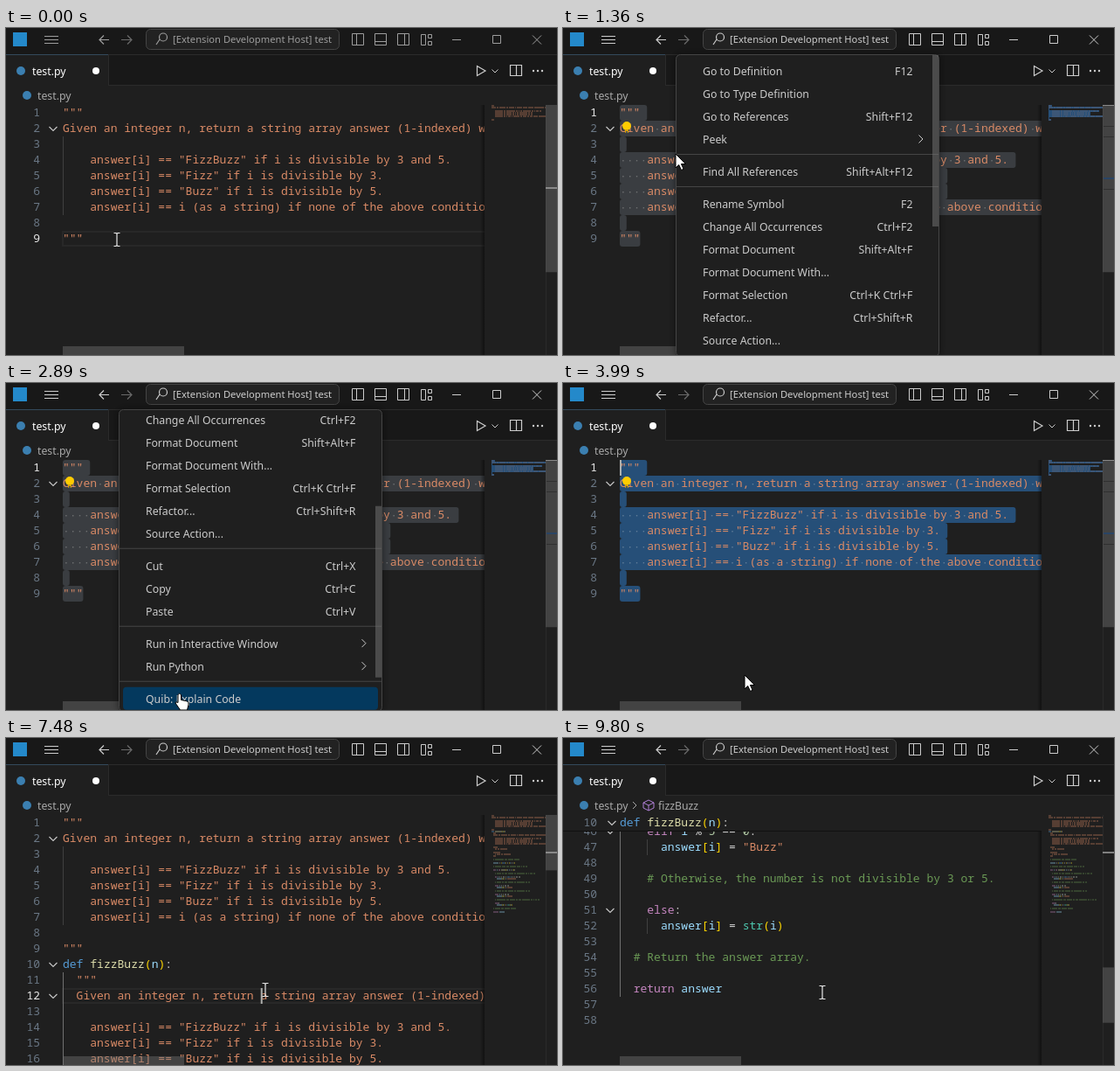
An HTML page with a canvas for the animation above (10000 ms loop, 631x374 px).

```html
<!DOCTYPE html>
<html lang="en">
<head>
<meta charset="utf-8">
<title>Editor</title>
<style>
html, body { margin: 0; width: 100%; height: 100%; overflow: hidden; background: #1f1f1f; }
canvas { display: block; }
</style>
</head>
<body>
<canvas id="stage" width="631" height="374"></canvas>
<script>
const ctx = document.getElementById('stage').getContext('2d');
const MONO = '13.03px "Noto Sans Mono", monospace';
const UI = '"Noto Sans", sans-serif';
const LOOP = 10000, LEFT = 65, TOP = 88, ROW = 18, CHAR = 7.818, VIEW = 286;
const FG = '#cccccc', BG = '#1f1f1f', BAR = '#181818', EDGE = '#2b2b2b', STRING = '#d98a66', NUM = '#6a7785';

// Moments in the story, in ms
const FOCUS = 100, DRAG = 300, RELEASE = 700, BLUR = 1110, MENU = 1140, BULB = 1240, PICK = 3830,
  NOTE = 4100, INSERT = 5560, COLOR = 6000, NOTE_END = 6600, CLICK = 7180, SYMBOL = 8110;

const cases = `    answer[i] == "FizzBuzz" if i is divisible by 3 and 5.
    answer[i] == "Fizz" if i is divisible by 3.
    answer[i] == "Buzz" if i is divisible by 5.
    answer[i] == i (as a string) if none of the above conditions are true.`;
const intro = 'Given an integer n, return a string array answer (1-indexed) where:';
const code = `"""
${intro}

${cases}

"""
def fizzBuzz(n):
  """
  ${intro}

${cases}

  Args:
    n: An integer.

  Returns:
    A list of strings.
  """

  # Initialize the answer array.

  answer = [None] * (n + 1)

  # Iterate over the numbers from 1 to n.

  for i in range(1, n + 1):

    # Check if the number is divisible by 3 and 5.

    if i % 3 == 0 and i % 5 == 0:
      answer[i] = "FizzBuzz"

    # Check if the number is divisible by 3.

    elif i % 3 == 0:
      answer[i] = "Fizz"

    # Check if the number is divisible by 5.

    elif i % 5 == 0:
      answer[i] = "Buzz"

    # Otherwise, the number is not divisible by 3 or 5.

    else:
      answer[i] = str(i)

  # Return the answer array.

  return answer

`.split('\n');

const rules = [
  [/^#/, '#6a9955'], [/^"/, STRING], [/^(def|None|and)$/, '#569cd6'],
  [/^(for|in|if|elif|else|return)$/, '#c586c0'], [/^str$/, '#4ec9b0'],
  [/^(fizzBuzz|range)$/, '#dcdcaa'], [/^\d/, '#b5cea8'], [/^\w/, '#9cdcfe'], [/^[()[\]]/, '#ffd700']
];
const isDoc = i => i < 9 || (i > 9 && i < 24);
const split = s => [...s.matchAll(/#.*|"[^"]*"|\w+|[()[\]]|[^\s\w"#()[\]]+/g)];
const colored = code.map((s, i) => isDoc(i)
  ? [[s, 0, STRING]]
  : split(s).map(m => [m[0], m.index, (rules.find(r => r[0].test(m[0])) || [0, '#d4d4d4'])[1]]));
const plain = code.map(s => [...s.matchAll(/[()[\]]|[^()[\]]+/g)]
  .map(m => [m[0], m.index, /[()[\]]/.test(m[0]) ? '#ffd700' : FG]));

const indent = s => s.search(/\S/);
const near = (i, d) => {
  while (code[i] === '') i += d;
  return code[i] === undefined ? 0 : indent(code[i]);
};
const folds = code.map((s, i) => s !== '' && near(i + 1, 1) > indent(s));
const levels = code.map((s, i) => {
  if (s) return Math.ceil(indent(s) / 4);
  const above = near(i, -1), below = near(i, 1);
  return above < below ? 1 + Math.floor(above / 4) : Math.ceil(below / 4);
});

const items = [
  ['Go to Definition', 'F12'], ['Go to Type Definition'], ['Go to References', 'Shift+F12'], ['Peek', '>'], 0,
  ['Find All References', 'Shift+Alt+F12'], 0,
  ['Rename Symbol', 'F2'], ['Change All Occurrences', 'Ctrl+F2'], ['Format Document', 'Shift+Alt+F'],
  ['Format Document With...'], ['Format Selection', 'Ctrl+K Ctrl+F'], ['Refactor...', 'Ctrl+Shift+R'],
  ['Source Action...'], 0,
  ['Cut', 'Ctrl+X'], ['Copy', 'Ctrl+C'], ['Paste', 'Ctrl+V'], 0,
  ['Run in Interactive Window', '>'], ['Run Python', '>'], 0,
  ['Quib: Explain Code'], ['Quib: Write Code'], 0,
  ['Command Palette...', 'Ctrl+Shift+P']
];

// Pointer stops: time, x, y
const stops = [
  [100, 127, 242], [250, 92, 242], [DRAG, 90, 242], [RELEASE, 66, 95], [750, 66, 95], [1080, 129, 144],
  [1520, 129, 144], [2070, 199, 355], [2890, 199, 355], [3020, 207, 325], [3520, 207, 325],
  [3630, 208, 334], [4050, 208, 334], [4600, 213, 280], [4860, 213, 280], [4950, 271, 272],
  [5210, 271, 272], [5360, 377, 266], [5560, 377, 266], [5750, 386, 256],
  [6500, 386, 256], [7100, 297, 288], [9580, 297, 288], [9800, 297, 291]
];

const clamp = (v, a, b) => Math.min(b, Math.max(a, v));

function pointer(t) {
  const k = stops.findIndex(s => s[0] > t);
  if (k < 1) return stops[k < 0 ? stops.length - 1 : 0].slice(1);
  const [a, b] = [stops[k - 1], stops[k]];
  let p = (t - a[0]) / (b[0] - a[0]);
  p = p * p * (3 - 2 * p);
  return [1, 2].map(j => a[j] + (b[j] - a[j]) * p);
}

// Wheel notches spread evenly from t0 to t1
const wheel = (t, t0, t1, n, size) => size * clamp(Math.floor((t - t0) / (t1 - t0) * (n - 1) + 1.001), 0, n);

const NOTCH = 800 / 19;
const scrollAt = t => wheel(t, 7680, 7880, 5, NOTCH) + wheel(t, 8520, 8640, 4, NOTCH)
  + wheel(t, 9040, 9140, 3, NOTCH) + wheel(t, 9580, 9800, 7, NOTCH);
const menuScroll = t => wheel(t, 2300, 2580, 7, 22) + wheel(t, 2890, 3020, 3, 94 / 3);

function rect(x, y, w, h, color, r = 0) {
  ctx.fillStyle = color;
  ctx.beginPath();
  ctx.roundRect(x, y, w, h, r);
  ctx.fill();
}
function text(s, x, y, color, font = MONO, align = 'left') {
  ctx.font = font;
  ctx.fillStyle = color;
  ctx.textAlign = align;
  ctx.fillText(s, x, y);
}
const label = (s, x, y, size = 12.3, color = FG, align) => text(s, x, y, color, `${size}px ${UI}`, align);
function stroke(d, color = FG, width = 1) {
  ctx.strokeStyle = color;
  ctx.lineWidth = width;
  ctx.stroke(new Path2D(d));
}
function dot(x, y, r, color) {
  rect(x - r, y - r, 2 * r, 2 * r, color, r);
}
function clipped(x, y, w, h, draw) {
  ctx.save();
  ctx.beginPath();
  ctx.rect(x, y, w, h);
  ctx.clip();
  draw();
  ctx.restore();
}
function panel(x, y, w, h, border) {
  ctx.save();
  ctx.shadowColor = 'rgba(0,0,0,.5)';
  ctx.shadowBlur = 8;
  rect(x, y, w, h, BG, 5);
  ctx.restore();
  ctx.strokeStyle = border;
  ctx.lineWidth = 1;
  ctx.beginPath();
  ctx.roundRect(x + .5, y + .5, w - 1, h - 1, 5);
  ctx.stroke();
}

function caretAt(t, [x, y]) {
  if (t < DRAG) return [8, 3];
  if (t >= CLICK) return [11, 29];
  if (t >= RELEASE) return [0, 0];
  const line = clamp(Math.floor((y - TOP) / ROW), 0, 8);
  return [line, clamp(Math.round((x - LEFT) / CHAR), 0, code[line].length)];
}
function caretOn(t) {
  if (t < FOCUS || (t >= BLUR && t < PICK)) return false;
  if (t < BLUR) return true;
  return Math.floor((t - (t < CLICK ? 3860 : CLICK)) / 500) % 2 === 0;
}

function drawLine(i, y, tokens) {
  for (const [s, col, color] of tokens[i]) text(s, LEFT + col * CHAR, y + 13, color);
}
const chevron = (x, y) => stroke(`M${x - 4.5} ${y - 2}l4.5 4.5 4.5-4.5`, '#c5c5c5', 1.2);

function drawEditor(t, mouse) {
  const count = t < INSERT ? 9 : 58, scroll = scrollAt(t), total = count * ROW + VIEW - ROW;
  const tokens = t < COLOR ? plain.map((p, i) => i < 9 ? colored[i] : p) : colored;
  const caret = caretAt(t, mouse), selecting = t >= DRAG && t < CLICK;
  const end = t < INSERT ? [8, 3] : [57, 0];
  const inactive = t >= BLUR && t < PICK;
  const selWidth = (i, from) => (i === end[0] ? end[1] : code[i].length + 1) - from;
  const selFrom = i => i === caret[0] ? caret[1] : 0;
  const selected = i => selecting && i >= caret[0] && i <= end[0];
  const yOf = i => TOP + i * ROW - scroll;

  clipped(0, TOP, 548, VIEW, () => {
    if (!selecting) {
      ctx.strokeStyle = '#282828';
      ctx.lineWidth = 2;
      ctx.strokeRect(LEFT, yOf(caret[0]) + 1, 490, ROW - 2);
    }
    for (let i = 0; i < count; i++) {
      const y = yOf(i);
      if (y < TOP - ROW || y > 374) continue;
      if (selected(i)) {
        const from = selFrom(i), x = LEFT + from * CHAR;
        rect(x, y, Math.max(0, selWidth(i, from) * CHAR), ROW, inactive ? '#3a3d41' : '#264f78', 3);
        for (let c = from; c < code[i].length; c++)
          if (code[i][c] === ' ') rect(LEFT + c * CHAR + 3.2, y + 9, 1.4, 1.4, 'rgba(227,228,226,.3)');
      }
      for (let k = 0; k < levels[i] && !selected(i); k++)
        rect(LEFT + Math.floor(k * 4 * CHAR), y, 1, ROW, i > 9 && k === 0 && t >= CLICK ? '#707070' : '#404040');
      text(i + 1, 39, y + 13, i === caret[0] ? '#e8e8e8' : NUM, MONO, 'right');
      if (folds[i] && (i < 9 || t > COLOR)) chevron(54, y + 9);
      drawLine(i, y, tokens);
    }
    if (t >= BULB && t < CLICK) {
      dot(73, 112, 5, '#ffcc00');
      rect(71, 116, 4, 4, '#d9a300', 1);
      rect(72, 118, 2, 2, '#555');
    }
    if (caretOn(t)) rect(LEFT + caret[1] * CHAR, yOf(caret[0]), 2, ROW, '#aeafad');
    rect(LEFT, 364, 139, 10, 'rgba(121,121,121,.4)');
  });

  // Minimap
  const shade = ctx.createLinearGradient(543, 0, 548, 0);
  shade.addColorStop(0, 'rgba(0,0,0,0)');
  shade.addColorStop(1, 'rgba(0,0,0,.45)');
  rect(543, TOP, 5, VIEW, shade);
  clipped(548, TOP, 70, VIEW, () => {
    for (let i = 0; i < count; i++) {
      const y = TOP + 2 * i;
      if (selected(i)) rect(556 + selFrom(i), y, Math.max(0, selWidth(i, selFrom(i))), 2, '#264f78');
      ctx.globalAlpha = selected(i) ? .25 : .6;
      for (const [s, col, color] of tokens[i])
        [...s].forEach((ch, j) => ch !== ' ' && rect(556 + col + j, y + .5, 1, 1, color));
      ctx.globalAlpha = 1;
    }
  });

  // Scrollbar and overview marks
  const unit = VIEW / total;
  rect(618, TOP, 1, VIEW, '#2a2a2a');
  rect(618, TOP + scroll * unit, 13, VIEW * unit + 1, 'rgba(121,121,121,.4)');
  rect(618, Math.floor(TOP + caret[0] * ROW * unit) - 1, 13, 2, 'rgba(160,160,160,.75)');
  if (t >= RELEASE && t < INSERT) {
    for (const y of [112, 124, 184]) rect(619, y, 12, 1, '#303030');
    rect(619, 171, 12, 2, '#2a4565');
  }

  if (scroll > 9 * ROW) {
    rect(0, TOP, 548, ROW, BG);
    rect(0, TOP + ROW, 548, 1, '#111');
    text(10, 39, TOP + 13, NUM, MONO, 'right');
    chevron(56, 97);
    drawLine(9, TOP, tokens);
  }
}

function drawChrome(t) {
  const tint = t < FOCUS ? '#9d9d9d' : FG;
  rect(0, 0, 631, 66, BAR);
  rect(0, 30, 631, 1, EDGE);
  rect(0, 65, 631, 1, EDGE);
  rect(0, 31, 117, 57, BG);
  rect(0, 66, 631, 22, BG);
  rect(117, 31, 1, 35, EDGE);
  rect(0, 30, 117, 1, '#34495c');

  rect(8, 5, 16, 16, '#2489ca');
  stroke('M44 9.5h16M44 13.5h16M44 17.5h16', tint);
  stroke('M118 13.5h-11M112 8.5l-5 5 5 5', tint, 1.2);
  stroke('M132 13.5h12M139 8.5l5 5-5 5', '#6a6a6a', 1.2);
  ctx.fillStyle = '#222222';
  ctx.beginPath();
  ctx.roundRect(160.5, 1.5, 221, 23, 5);
  ctx.fill();
  ctx.strokeStyle = '#454545';
  ctx.lineWidth = 1;
  ctx.stroke();
  stroke('M176 13l-4 6M184.5 10.5a4.5 4.5 0 1 1-9 0a4.5 4.5 0 1 1 9 0', tint, 1.2);
  label('[Extension Development Host] test', 191, 17, 11.2, tint);
  for (const [x, bar] of [[396.5, 'M401.5 6.5v13'], [422.5, 'M422.5 15.5h13'], [448.5, 'M456.5 6.5v13']])
    stroke(`M${x} 6.5h13v13h-13z${bar}`, tint);
  stroke('M475.5 7.5h5v12h-5zM483.5 7.5h4v4h-4zM483.5 15.5h4v4h-4z', tint);
  stroke('M511 13.5h10M557.5 8.5h9v9h-9zM603 8.5l10 10M613 8.5l-10 10', tint);

  dot(17, 49, 5, '#3b7fb0');
  label('test.py', 30, 54, 12.3, '#ffffff');
  dot(103, 49, 4, '#ffffff');
  stroke('M539.5 43.5l9.5 5.5-9.5 5.5z', FG, 1.2);
  stroke('M556.5 47.5l3.5 3.5 3.5-3.5');
  stroke('M577.5 42.5h13v12h-13zM584.5 42.5v12', FG, 1.2);
  for (const x of [604, 609, 614]) dot(x, 49, 1.2, FG);

  dot(24, 77, 5, '#3b7fb0');
  label('test.py', 36, 82, 12.3, '#a9a9a9');
  if (t >= SYMBOL) {
    stroke('M80 73l4 4-4 4', '#a9a9a9');
    stroke('M98 71l6 3v6l-6 3-6-3v-6zM92 74l6 3 6-3M98 77v6', '#b180d7');
    label('fizzBuzz', 109, 82, 12.3, '#a9a9a9');
  }
}

function drawMenu(t, [mx, my]) {
  const scroll = menuScroll(t);
  panel(129, 30, 302, 346, '#454545');
  clipped(130, 31, 300, 343, () => {
    let y = 36 - scroll;
    for (const item of items) {
      if (!item) {
        rect(130, y + 4, 300, 1, '#454545');
        y += 11;
        continue;
      }
      const [name, key] = item;
      if (mx > 134 && my >= y && my < y + 26) rect(134, y, 292, 26, '#04395e', 4);
      label(name, 160, y + 18);
      if (key === '>') stroke(`M407.5 ${y + 8.5}l4.5 4.5-4.5 4.5`);
      else if (key) label(key, 400.5, y + 18, 12.3, FG, 'right');
      y += 26;
    }
    rect(423, 31 + scroll / 248 * 147, 7, 196, 'rgba(121,121,121,.5)');
  });
}

function drawNote(t) {
  const p = clamp((t - NOTE) / 300, 0, 1), slide = (1 - p) ** 3 * 60;
  ctx.save();
  ctx.globalAlpha = p;
  ctx.translate(0, slide);
  panel(169, 321, 452, 44, '#333333');
  stroke('M195.5 343a7 7 0 1 1-14 0a7 7 0 1 1 14 0', '#3794ff', 1.2);
  rect(187.8, 341.5, 1.5, 5.5, '#3794ff');
  rect(187.8, 338.5, 1.5, 1.5, '#3794ff');
  label('Quib is working...', 201, 348, 12);
  ctx.restore();
}

const arrow = new Path2D('M0 0v16l3.7-3.5 2.8 6 2.6-1.2-2.7-5.8h5z');
const hand = new Path2D('M-2 1.5q1.5-2.5 3.5 0v6l7 1.5q2 1 1.5 4l-1.5 6h-8l-5.5-8q0-2 3-.5z');

function drawPointer(t, [x, y]) {
  ctx.save();
  ctx.translate(x, y);
  if (t < RELEASE || t > 4050) {
    stroke('M-3.5-7.5h2.5l1 1 1-1h2.5M0-7v14M-3.5 7.5h2.5l1-1 1 1h2.5', '#e8e8e8', 1.2);
  } else {
    const shape = t >= MENU && t < PICK && x > 134 ? hand : arrow;
    ctx.fillStyle = '#ffffff';
    ctx.strokeStyle = '#000000';
    ctx.lineWidth = 1;
    ctx.fill(shape);
    ctx.stroke(shape);
  }
  ctx.restore();
}

function frame() {
  const t = performance.now() % LOOP, mouse = pointer(t);
  rect(0, 0, 631, 374, BG);
  drawEditor(t, mouse);
  drawChrome(t);
  if (t >= MENU && t < PICK) drawMenu(t, mouse);
  if (t >= NOTE && t < NOTE_END) drawNote(t);
  drawPointer(t, mouse);
  requestAnimationFrame(frame);
}
frame();
</script>
</body>
</html>
```
